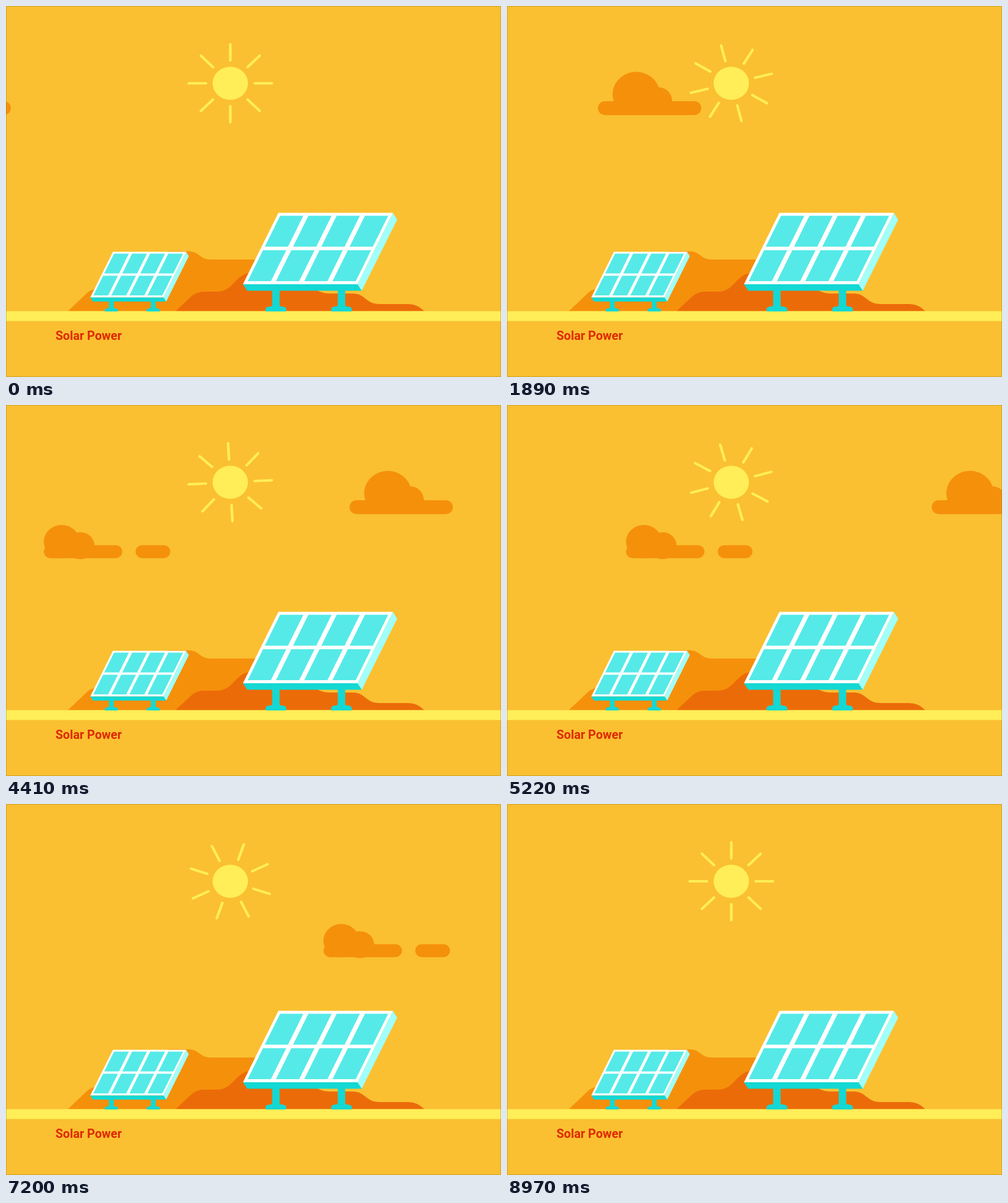
An HTML page that plays this animation: 800 by 600 pixels, repeating every 9000 ms.

```html
<!DOCTYPE html>
<html lang="en">
<head>
<meta charset="utf-8">
<title>Solar Power</title>
<style>
  html, body { margin: 0; width: 100%; height: 100%; overflow: hidden; background: #fac031; }
  svg { display: block; width: 100%; height: 100%; }
  .sun { fill: #ffee58; stroke: #ffee58; }
  .cloud, .hill { fill: #f5900b; }
  .hill.near { fill: #ec6b09; }
  .face { fill: #fff; }
  .cell { fill: #55eae7; }
  .side { fill: #a0fffb; }
  .base { fill: #14d8d3; }
  text { font: 700 19.7px Roboto, Arial, sans-serif; fill: #de2a00; }
</style>
</head>
<body>
<svg viewBox="0 0 800 600">
  <rect width="800" height="600" fill="#fac031"/>

  <!-- the whole sun is slightly wider than tall -->
  <g class="sun" transform="translate(362.5 125) scale(1.0667 1)">
    <circle r="26.8" stroke="none"/>
    <g id="rays" stroke-width="4" stroke-linecap="round"></g>
  </g>

  <g id="cloudA" class="cloud">
    <rect y="154" width="167" height="22.4" rx="11.2"/>
    <path d="M25.5 154 A38 36 0 1 1 98.3 131.5 A22 22.5 0 0 1 120 154 V156 H26z"/>
  </g>
  <g id="cloudB" class="cloud">
    <rect y="226.7" width="127" height="21" rx="10.5"/>
    <rect x="148.3" y="226.7" width="56.3" height="21" rx="10.5"/>
    <ellipse cx="29" cy="221" rx="29" ry="27"/>
    <ellipse cx="59" cy="227.5" rx="23" ry="21.8"/>
  </g>

  <path class="hill" d="M100 493.5 L130 465 Q138 457 150 457 H200 L262 396.8 H296 C312 397 313 410 331 410 H420 V493.5z"/>
  <path class="hill near" d="M274 493.5 L298 471 Q307 462 320 462 H340 Q354 462 363 453 L374 442 Q385 431 400 431 H420 L500 458 Q510 465 522 465 H560 C582 465 580 482 604 482 H650 Q665 482 676 493.5z"/>
  <rect y="493.5" width="800" height="16" fill="#ffee58"/>

  <g id="panels"></g>
  <text x="80" y="540">Solar Power</text>
  <rect x=".5" y=".5" width="799" height="599" fill="none" stroke="#6b5a20" stroke-opacity=".3"/>
</svg>
<script>
  const LOOP = 9000, STEP = 30, SPEED = 0.162, GROUND = 494;
  const SLANT = 0.4957, W = 185, H = 115.5;
  const $ = id => document.getElementById(id);

  function leg(cx, bottom) {
    return `<path class="base" d="M${cx - 6} 124 V${bottom - 11} q0 3 -3 3 h-1 q-7 0 -7 6 q0 2 2 2
      h30 q2 0 2 -2 q0 -6 -7 -6 h-1 q-3 0 -3 -3 V124z"/>`;
  }

  function panel(x, y, scale) {
    const bottom = (GROUND - y) / scale, shift = SLANT * H;
    let cells = '';
    for (let row = 0; row < 2; row++)
      for (let col = 0; col < 4; col++)
        cells += `<rect class="cell" x="${5.2 + col * 45.7}" y="${4.8 + row * 55.7}" width="37.5" height="50"/>`;
    return `<g transform="translate(${x} ${y}) scale(${scale})">
      ${leg(-4, bottom)}${leg(102, bottom)}
      <path class="side" d="M${W} 0 l7 11 l${-shift} ${H - .5} l-7 -10.5z"/>
      <path class="base" d="M${-shift} ${H} h${W} l7 10.5 h${-W}z"/>
      <g transform="matrix(1 0 ${-SLANT} 1 0 0)">
        <rect class="face" width="${W}" height="${H}"/>${cells}
      </g></g>`;
  }

  $('panels').innerHTML = panel(172.8, 397.5, 0.639) + panel(440.2, 334.5, 1);
  $('rays').innerHTML = Array.from({ length: 8 }, (_, i) =>
    `<path d="M0 -37 V-63" transform="rotate(${i * 45})"/>`).join('');

  const slide = (id, x) => $(id).setAttribute('transform', `translate(${x} 0)`);

  function draw(t) {
    $('rays').setAttribute('transform', `rotate(${360 * t / (LOOP - STEP)})`);
    slide('cloudA', -159.2 + SPEED * t);
    slide('cloudB', -653.4 + SPEED * t);
  }

  const start = performance.now();
  function tick() {
    const t = (performance.now() - start) % LOOP;
    draw(Math.floor(t / STEP) * STEP);
    requestAnimationFrame(tick);
  }
  tick();
</script>
</body>
</html>
```
